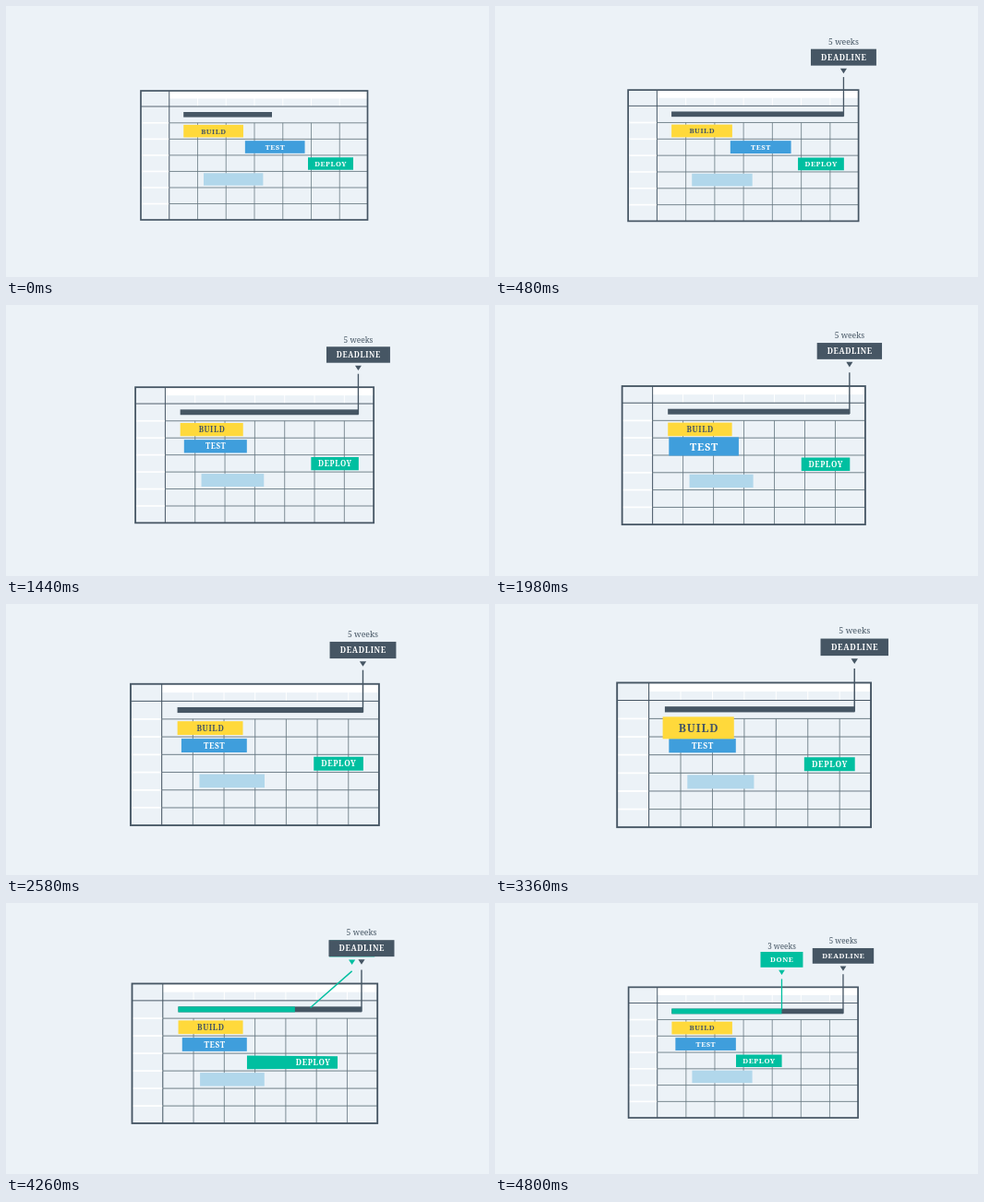
Write an HTML page that moves like this. It is 523x294 px and loops after 5.8 s.

```html
<!DOCTYPE html>
<html lang="en">
<head>
<meta charset="utf-8">
<title>Project timeline</title>
<style>
  html, body { margin: 0; width: 100%; height: 100%; overflow: hidden; background: #ecf2f7; }
  svg { display: block; width: 100%; height: 100%; }
  text { font-family: "Noto Serif", serif; text-anchor: middle; }
  .label { font-size: 7.6px; font-weight: 700; letter-spacing: .55px; }
  .weeks { font-size: 8px; }
</style>
</head>
<body>
<svg id="stage" viewBox="0 0 523 294"></svg>
<script>
const DARK = '#465664', TEAL = '#00bfa0', BLUE = '#3f9edc', YELLOW = '#ffd93b', PALE = '#b1d7eb';
const LOOP = 5800, STEP = 60, LAST = 4800;
const LEFT = 192.2, DUE = 375.8, FINISH = 309.9;

function add(parent, tag, attrs, text) {
  const el = document.createElementNS('http://www.w3.org/2000/svg', tag);
  set(el, attrs);
  if (text) el.textContent = text;
  return parent.appendChild(el);
}
function set(el, attrs) {
  for (const k in attrs) el.setAttribute(k, attrs[k]);
}
const rect = (p, x, y, width, height, fill) => add(p, 'rect', { x, y, width, height, fill });
const line = (p, x1, y1, x2, y2, stroke, w) =>
  add(p, 'line', { x1, y1, x2, y2, stroke, 'stroke-width': w });
const label = (p, text, y, fill) => add(p, 'text', { class: 'label', x: .27, y, fill }, text);

const world = add(document.getElementById('stage'), 'g', {});

// Chart grid
const X0 = 146, X1 = 391.5, Y0 = 92, Y1 = 232, COL = 30.75, ROW = 17.55;
rect(world, X0 + COL, Y0, X1 - X0 - COL, 8.5, '#fff');
for (let i = 1; i < 8; i++) {
  const x = X0 + i * COL;
  if (i > 1) line(world, x, 100, x, 108.6, '#fff', .9);
  line(world, x, i > 1 ? 126.8 : Y0, x, Y1, i > 1 ? '#6c7d86' : DARK, i > 1 ? .8 : .95);
}
line(world, X0, 109, X1, 109, DARK, .9);
for (let i = 0; i < 6; i++) {
  const y = 126.8 + i * ROW;
  line(world, X0, y, X0 + COL - .5, y, '#fff', 1.6);
  line(world, X0 + COL, y, X1, y, '#667780', .85);
}
add(world, 'rect', { x: X0, y: Y0, width: X1 - X0, height: Y1 - Y0, fill: 'none', stroke: DARK, 'stroke-width': 1.7 });

// Progress bar and markers
const total = rect(world, LEFT, 115, 0, 5.6, DARK);
const progress = rect(world, LEFT, 115, 0, 5.6, TEAL);

function marker(weeks, name, half, weeksY, color) {
  const stem = line(world, 0, 0, 0, 0, color, 1.3);
  const head = add(world, 'g', {});
  const note = add(head, 'text', { class: 'weeks', x: 0, y: weeksY, fill: DARK }, weeks);
  rect(head, -half, -24.6, half * 2, 16.6, color);
  label(head, name, -13.5, '#fff');
  add(head, 'path', { d: 'M-3.3-5.2H3.3L0 0Z', fill: color });
  return { stem, head, note };
}
const done = marker('3 weeks', 'DONE', 22.7, -27.1, TEAL);
const due = marker('5 weeks', 'DEADLINE', 32.8, -29.1, DARK);

// Tasks
rect(world, 214, 181.3, 64.4, 13.4, PALE);

function task(name, fill, ink) {
  const g = add(world, 'g', {});
  return { g, box: rect(g, 0, 0, 0, 0, fill), text: label(g, name, 2.8, ink) };
}
const test = task('TEST', BLUE, '#fff');
const build = task('BUILD', YELLOW, DARK);
const deployBox = add(world, 'path', { fill: TEAL });
const deployText = label(world, 'DEPLOY', 173.9, '#fff');

function placeTask(t, x, y, swell, growX, growY, growText) {
  const w = 64.7 + growX * swell, h = 13.6 + growY * swell;
  set(t.g, { transform: `translate(${x} ${y})` });
  set(t.box, { x: -w / 2, y: -h / 2, width: w, height: h });
  set(t.text, { transform: `scale(${1 + growText * swell})` });
}

// Timing
const span = (t, a, b) => Math.min(1, Math.max(0, (t - a) / (b - a)));
const mix = (a, b, p) => a + (b - a) * p;
const inOut = u => u < .5 ? 4 * u ** 3 : 1 - 4 * (1 - u) ** 3;
const out = u => 1 - (1 - u) ** 3;
const outBack = u => 1 + 2.70158 * (u - 1) ** 3 + 1.70158 * (u - 1) ** 2;
const pulse = (t, a, b) => inOut(span(t, a, a + 240)) - inOut(span(t, b - 240, b));

function zoom(t) {
  const u = span(t, 0, 3800);
  const near = 1 + .127 * (u + .72 * u ** 3 * (1 - u));
  return mix(near, 1.012, inOut(span(t, 3800, 4800)));
}

function draw(t) {
  set(world, { transform: `translate(261.5 147) scale(${zoom(t)}) translate(-261.5 -147)` });
  const bob = -Math.cos((t - 1980) / 1100 * 2 * Math.PI);

  set(total, { width: mix(288, DUE, out(span(t, 0, 300))) - LEFT });
  set(progress, { width: (FINISH - LEFT) * out(span(t, 3860, 4360)) });

  // Deadline marker pops up from the bar
  const rise = out(span(t, 180, 360));
  set(due.stem, { x1: DUE - .2, x2: DUE - .2, y1: 120, y2: mix(120, 78.2, rise), visibility: rise ? 'visible' : 'hidden' });
  const pop = span(t, 240, 560);
  set(due.head, {
    transform: `translate(${DUE - .2} ${73.8 + bob}) scale(${Math.max(0, outBack(pop))})`,
    visibility: pop ? 'visible' : 'hidden'
  });

  // Done marker swings away, foot first
  const shown = t >= 3960 ? 'visible' : 'hidden';
  const foot = mix(DUE, FINISH, inOut(span(t, 4000, 4420)));
  const lead = inOut(span(t, 4140, 4500));
  const headX = mix(DUE, FINISH, lead), tip = mix(73.4, 77.8, lead);
  set(done.stem, { x1: foot, y1: 116, x2: headX, y2: tip + 5.4, visibility: shown });
  set(done.head, { transform: `translate(${headX} ${tip + bob})`, visibility: shown });
  set(done.note, { opacity: span(lead, .3, .7) });

  placeTask(test, mix(291.2, 228.5, inOut(span(t, 360, 840))), 153, pulse(t, 1700, 2400), 5.8, 5.2, .36);
  placeTask(build, 224.6, 135.7, pulse(t, 3060, 3760), 4.2, 7.8, .43);

  // Deploy stretches: left edge leads, right edge follows
  const a = inOut(span(t, 3900, 4250)), b = inOut(span(t, 4100, 4454));
  const l = mix(327, 261, a), r = mix(376, 310, b), taper = a - b;
  set(deployBox, { d: `M${l} 164.2L${r} ${164.2 + taper}V${177.7 - taper * .6}L${l} 177.7Z` });
  set(deployText, { x: r - 24.3 });
}

function tick(now) {
  const t = (now - start) % LOOP;
  draw(Math.min(LAST, Math.floor(Math.max(0, t) / STEP) * STEP));
  requestAnimationFrame(tick);
}
const start = performance.now();
draw(0);
requestAnimationFrame(tick);
</script>
</body>
</html>
```
